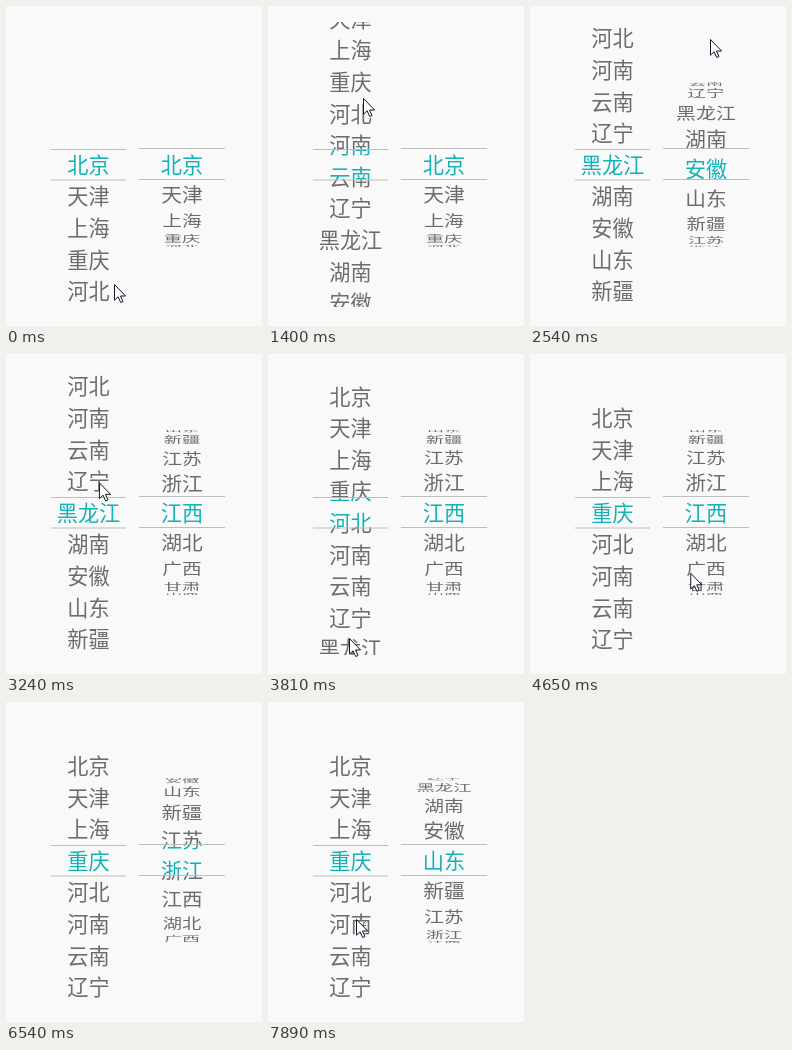
These frames come from a looping animation (256 px wide and 320 px high, 8000 ms). An HTML page:

```html
<!DOCTYPE html>
<html lang="zh-CN">
<head>
<meta charset="utf-8">
<title>Wheel picker</title>
<style>
  html, body { margin: 0; width: 100%; height: 100%; overflow: hidden; background: #f9f9f9; }
  svg { display: block; width: 100vw; height: 100vh; }
  text { font: 21.2px "Noto Sans CJK SC", "Noto Sans CJK JP", "Noto Sans CJK", sans-serif; text-anchor: middle; }
</style>
</head>
<body>
<svg viewBox="0 0 256 320">
  <defs>
    <clipPath id="flatView"><rect x="40" y="16" width="86" height="285"/></clipPath>
    <clipPath id="drumView"><rect x="130" y="76" width="92" height="165"/></clipPath>
    <clipPath id="flatBand"><rect x="40" y="143" width="86" height="31"/></clipPath>
    <clipPath id="drumBand"><rect x="130" y="142" width="92" height="31"/></clipPath>
  </defs>
  <rect width="256" height="320" fill="#f9f9f9"/>
  <g id="wheels"></g>
  <path id="cursor" d="M.5 .5V16.2L4.1 12.8L6.7 18.5L9 17.5L6.5 12H11.6Z" fill="#fff" stroke="#15152a"/>
</svg>
<script>
const LOOP = 8000, TICK = 141, PHASE = 10;
const NAMES = ('北京 天津 上海 重庆 河北 河南 云南 辽宁 黑龙江 湖南 安徽 山东 新疆 江苏 浙江 江西 ' +
  '湖北 广西 甘肃 山西 内蒙古 陕西 吉林 福建 贵州 广东 青海').split(' ');

// ticks: press, release, rest; scroll: the wheel's position at each of them
const DRAGS = [
  { wheel: 'flat', ticks: [7, 10, 15], scroll: [0, 5.62, 8], from: [108, 278], to: [95, 92] },
  { wheel: 'drum', ticks: [15, 18, 24], scroll: [0, 9.84, 15], from: [191, 222], to: [180, 33] },
  { wheel: 'flat', ticks: [24, 27, 29], scroll: [8, 3.68, 3], from: [86, 136], to: [81, 284] },
  { wheel: 'drum', ticks: [36, 40, 42], scroll: [15, 19.49, 20], from: [188, 196], to: [183, 49] },
  { wheel: 'drum', ticks: [43, 46, 52], scroll: [20, 13.68, 11], from: [183, 53], to: [178, 360] }
];
const PARK = { ticks: [56], from: [88, 217] };

const el = id => document.getElementById(id);
const mix = (a, b, p) => a + (b - a) * p;
const part = (t, a, b) => Math.min(1, Math.max(0, (t - a) / (b - a)));
const flick = p => p ** 4;
const settle = p => 1 - (1 - p) ** 3;
const glide = p => p * p * (3 - 2 * p);

function scrollAt(wheel, t) {
  const drags = DRAGS.filter(d => d.wheel === wheel);
  const { ticks: [press, release, rest], scroll: [a, b, c] } =
    drags.findLast(d => t >= d.ticks[0]) || drags[0];
  return t < release ? mix(a, b, flick(part(t, press, release)))
                     : mix(b, c, settle(part(t, release, rest)));
}

function cursorAt(t) {
  const i = Math.max(0, DRAGS.findLastIndex(d => t >= d.ticks[0]));
  const { ticks: [press, release], from, to } = DRAGS[i];
  const next = DRAGS[i + 1] || PARK;
  const drag = flick(part(t, press, release));
  const move = glide(part(t, release, next.ticks[0]));
  return [0, 1].map(k => mix(mix(from[k], to[k], drag), next.from[k], move));
}

function makeWheel(id, x, half, top, bottom, place) {
  const line = y => `<path d="M${x - half} ${y}H${x + half}" stroke="#bdbdbd"/>`;
  el('wheels').insertAdjacentHTML('beforeend', `
    <g clip-path="url(#${id}View)">
      <g id="${id}" fill="#6c6c6c">${NAMES.map(n => `<text y="8">${n}</text>`).join('')}</g>
      <rect x="${x - half}" y="${top}" width="${2 * half}" height="31" fill="#f9f9f9"/>
      <g clip-path="url(#${id}Band)" fill="#14b2b6"></g>
    </g>${line(top + .5)}${line(bottom)}`);
  const grey = el(id);
  const teal = grey.parentNode.lastElementChild;
  teal.innerHTML = grey.innerHTML;
  return t => {
    const scroll = scrollAt(id, t);
    NAMES.forEach((_, i) => {
      const pose = place(i - scroll);
      for (const layer of [grey, teal]) {
        const item = layer.children[i];
        item.setAttribute('display', pose ? 'inline' : 'none');
        if (pose) item.setAttribute('transform', `translate(${x} ${pose.y}) scale(${pose.sx} ${pose.sy})`);
      }
    });
  };
}

function placeFlat(k) {
  return Math.abs(k) < 5.2 && { y: 158.8 + k * 31.6, sx: 1, sy: 1 };
}

// Items sit on a cylinder seen with slight perspective
function placeDrum(k) {
  const R = 82.5, DEPTH = 290, angle = k * 21 * Math.PI / 180;
  if (Math.abs(angle) >= Math.PI / 2) return null;
  const cos = Math.cos(angle);
  const sx = DEPTH / (DEPTH + R * (1 - cos));
  return { y: 158.6 + R * Math.sin(angle), sx, sy: sx * mix(.1, 1, cos) };
}

const setFlat = makeWheel('flat', 82.5, 37.5, 143, 174, placeFlat);
const setDrum = makeWheel('drum', 176, 43, 142, 173.5, placeDrum);

function draw(time) {
  // The screen refreshes in even ticks
  const t = PHASE + Math.floor((time % LOOP - 1400) / TICK);
  setFlat(t);
  setDrum(t);
  el('cursor').setAttribute('transform', `translate(${cursorAt(t)})`);
}

const begin = performance.now();
function frame() {
  draw(performance.now() - begin);
  requestAnimationFrame(frame);
}
frame();
</script>
</body>
</html>
```
